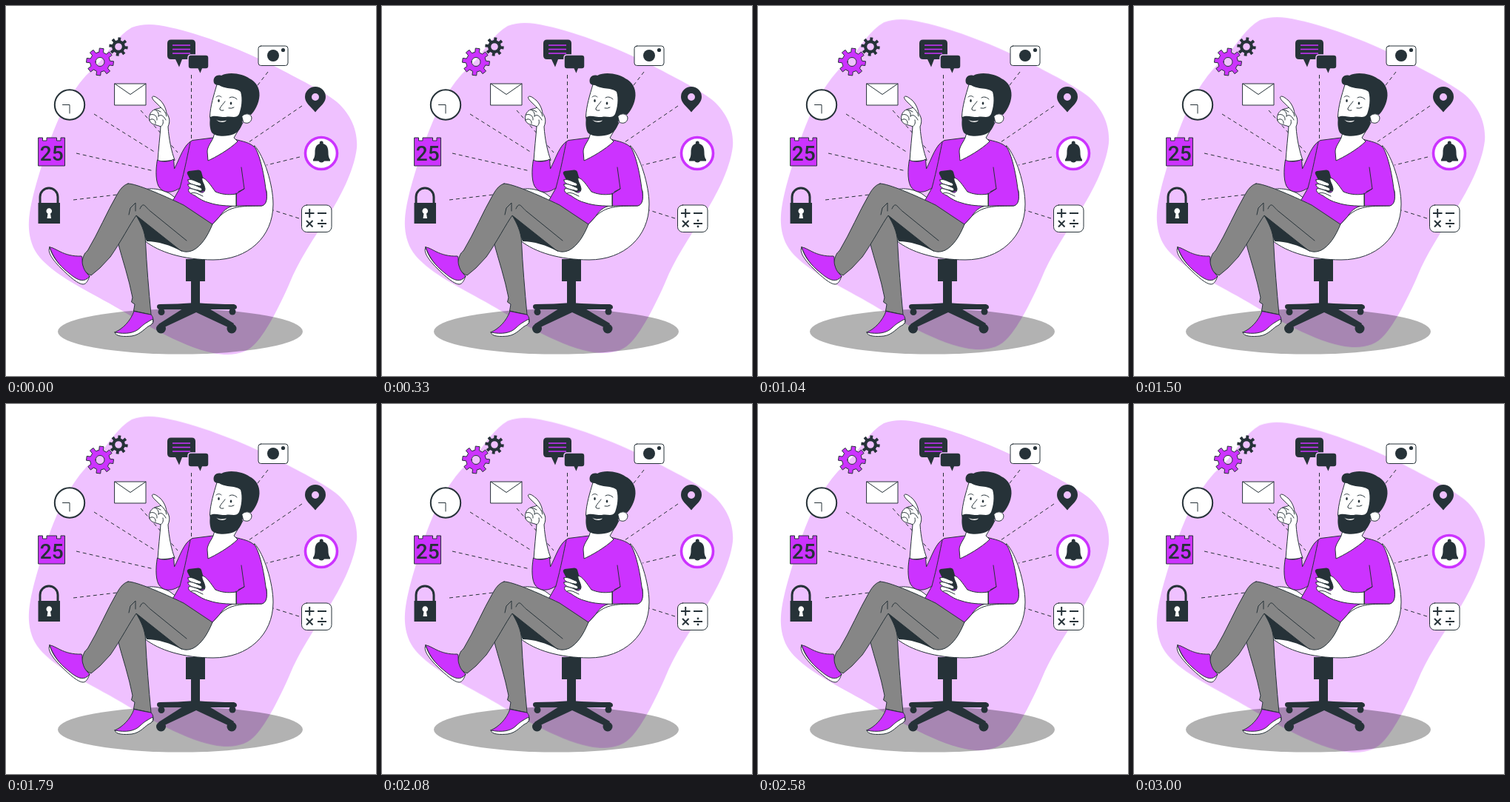
Write an HTML page that moves like this. It is 500x500 px and loops after 3.04 s.

```html
<!DOCTYPE html>
<html lang="en">
<head>
<meta charset="utf-8">
<title>Phone apps</title>
<style>
html, body { margin: 0; width: 100%; height: 100%; overflow: hidden; background: #fff; }
svg { display: block; width: 100vw; height: 100vh; }
.ink { fill: #263238; }
.pop { fill: #cc33ff; }
.paper { fill: #fff; }
.cloth { fill: #868686; }
.edge { stroke: #263238; stroke-width: 1; stroke-linejoin: round; stroke-linecap: round; }
.line { fill: none; stroke: #263238; stroke-width: 1; stroke-linejoin: round; stroke-linecap: round; }
.day { font: 500 28px Roboto, "Open Sans", sans-serif; font-stretch: 75%; text-anchor: middle; }
</style>
</head>
<body>
<svg viewBox="0 0 500 500">
  <path id="blob" fill="#efc1ff" d="M31 290C33 262 45 225 60 180C72 148 85 120 108 94C115 87 121 81 127 75C140 60 151 40 170 29C185 23.500 200 23.500 222 29C265 38 325 62 360 80C395 98 430 116 445 128C465 144 476 168 474 192C470 225 450 260 438 280C415 315 395 345 383 375C370 405 352 440 338 455C325 470 305 474 280 469C235 460 180 425 140 402C100 380 60 360 42 335C33 322 30 305 31 290Z"/>
  <ellipse cx="235.500" cy="440" rx="165.500" ry="30.500" opacity=".3"/>
  <path class="line" stroke-dasharray="5 4" style="stroke-linecap:butt" d="M119 146L202 198M95 199L200 223M91 262L150 255M182 141L232 198M250.500 93V180M354 89L320 133M400 135L328 184M397 204L352 215M396 287L358 275"/>

  <g id="gears"></g>

  <g id="chat">
    <path class="ink" d="M223 45.500H251Q256 45.500 256 50.500V67Q256 72 251 72H238L234 82.500L229 72H223Q218 72 218 67V50.500Q218 45.500 223 45.500Z"/>
    <path d="M225 53H249M225 58.500H249M225 64H249" stroke="#cc33ff" stroke-width="1.300"/>
    <path class="ink" stroke="#efc1ff" stroke-width="1.500" d="M250 66H270Q274 66 274 70V81Q274 85 270 85H265.500L262.500 92.500L259 85H250Q246 85 246 81V70Q246 66 250 66Z"/>
  </g>

  <g id="camera">
    <rect class="paper edge" x="341" y="54" width="40" height="26.500" rx="3.500"/>
    <circle class="ink" cx="361" cy="67" r="8"/>
    <circle class="ink" cx="374.500" cy="59.500" r="2.600"/>
  </g>

  <path class="ink" fill-rule="evenodd" d="M418 143.500C412 136 404 131 404 123A14 14 0 0 1 432 123C432 131 424 136 418 143.500ZM413 123A5 5 0 0 0 423 123A5 5 0 0 0 413 123Z"/>

  <g id="bell">
    <circle class="paper" cx="426" cy="199" r="21.500" stroke="#cc33ff" stroke-width="3.600"/>
    <path class="ink" d="M424 186A2.500 2.500 0 1 1 428.500 186C434 187.500 435.500 192 435.500 198C435.500 204 437 206 438 207.500V209.500H430A4 3.200 0 0 1 422.500 209.500H415V207.500C416 206 417.500 204 417.500 198C417.500 192 419 187.500 424 186Z"/>
  </g>

  <g id="calculator">
    <rect class="paper edge" x="399.500" y="269" width="40.500" height="36.500" rx="7"/>
    <path class="line" style="stroke-width:2;stroke-linecap:butt" d="M404 280H416.500M410.200 274V286M421 280H433M406 290L414.500 298.500M414.500 290L406 298.500M421 294H433"/>
    <circle class="ink" cx="427" cy="290" r="1.400"/>
    <circle class="ink" cx="427" cy="298" r="1.400"/>
  </g>

  <circle class="paper" cx="86" cy="133.500" r="20.200" stroke="#263238" stroke-width="2"/>
  <path class="line" d="M76.500 133.500H86V145"/>

  <path class="paper edge" d="M147 105H189V134H147Z"/>
  <path class="line" d="M147 105L168 119.500L189 105"/>

  <path class="pop edge" d="M44 178H49.500V182H55V178H68.500V182H74V178H79.500V216H44Z"/>
  <text class="ink day" x="61.700" y="209">25</text>

  <path class="line" style="stroke-width:3;stroke-linecap:butt" d="M46 267V258A12 12 0 0 1 70 258V267"/>
  <path class="ink" d="M43.500 266H73V294H43.500Z"/>
  <path class="paper" d="M56.500 280.500A3.800 3.800 0 1 1 60 280.500L61 287H55.500Z"/>

  <g id="base">
    <path class="ink" d="M243 342H269V372H262V404H250V372H243Z"/>
    <path class="ink" d="M208 403Q232 403 256 401Q284 403 308 403Q312 404 312 407Q312 410 308 410H208Q204 410 204 406Q204 403 208 403Z"/>
    <circle class="ink" cx="210" cy="413.500" r="4.500"/>
    <circle class="ink" cx="306" cy="413" r="4.500"/>
    <path class="ink" d="M250 402H263L308 429L304 436L257 414L210 436L206 430Z"/>
    <circle class="ink" cx="209.500" cy="436" r="6.500"/>
    <circle class="ink" cx="305" cy="436" r="6.500"/>
  </g>

  <g id="seat">
    <path class="paper edge" d="M336 189C349 203 361 242 361 268C361 312 327 343 280 343C240 343 207 333 187 317L178 252C190 244 208 246 222 254L240 268L320 260Z"/>
    <path class="line" d="M352 250C353 262 351 269 345 270C325 271 305 268 289 284L278 296"/>
  </g>

  <g id="farleg">
    <path class="ink" d="M175 282L190 318C205 318 222 323 238 332L240 320Z"/>
    <path class="cloth edge" d="M176 283C182 293 188 305 188.500 318C190 350 193 385 196 417L172.500 412L174 403L169.500 400L171 394C166 368 158 345 151 319Z"/>
    <path class="pop edge" d="M173 412.500C181 414 189 416 196 417C199 420 199.500 425 198.500 429C189 432 182 443 168 445C158 446 151 444 147 441C158 436 168 426 173 412.500Z"/>
    <path class="paper edge" d="M147 441C162 444 174 442 181 435C187 429 193 426 198.500 423Q200 428 196 431C188 434 183 444 170 446C160 447 148 447 147 441Z"/>
  </g>

  <g id="torso">
    <path class="paper edge" d="M205 210C206 193 208 177 209 163C203 160 195 161 193.500 153C193 146 197 141 201 140C204 138 207 139 209 137C206 133 197 127 197.500 123C200 120 205 125 208 127C213 132 216 138 217 145C221 150 222 156 219 163C220 180 224 198 228 208Z"/>
    <path class="line" d="M209 137C213 140 216 144 217 149M201 140C205 142 207 145 206 149M195 147C200 145 205 149 204 154M194 154C198 151 203 154 202 159M206 149C210 145 214 150 216 154M203 140L209 143M209 163C212 161 213 158 212 154"/>
    <path class="pop edge" d="M280 178L252 181.500C240 187 235 206 227.500 220L226.500 207C220 211 210 211 204.500 208C202 222 202 240 208 246C215 254 226 252 235 246L222 269L278 296L289 284C295 274 303 270 311 270H346C354 268 353 255 351 247C349 230 344 204 337 192C330 184 319 183 309 180Z"/>
    <path class="line" d="M249 184C246 198 242 220 235 246M318 218L322 247L311 254M322 247L314 251"/>
    <path class="paper edge" d="M283 168L280 178C277 185 272 190 272 197L273 209C282 205 302 194 313 183L308 178L320 158Z"/>
  </g>

  <g id="phone">
    <path class="ink" d="M247 223L260 221.500Q263 221.500 264 224L271 249L258 253L245 227Q244 224 247 223Z"/>
    <path class="paper edge" d="M311 254C299 256 290 254 283 251C277 243 271 233 265 232C264 237 268 240 269 247C269 252 265 254 260 250C255 248 250 246 247 247C245 251 250 254 255 256C262 261 267 264 275 266C287 270 299 270 311 270.500Z"/>
    <path class="paper edge" d="M246 235C251 233 256 237 262 239C265 241 264 244 260 243C254 242 245 240 246 235Z"/>
    <path class="paper edge" d="M246 241C250 239 257 243 264 246C266 249 264 251 260 249C254 248 245 246 246 241Z"/>
    <path class="line" d="M250 253C255 251 260 254 266 257"/>
    <path class="line" d="M311 253V270"/>
  </g>

  <g id="nearleg">
    <path class="cloth edge" d="M165 240C176 240 211 255 240 269L279 295C272 312 264 324 253 330C246 333 240 333 234 329L176 283C168 294 155 319 141 339L127 354L115 364C106 361 101 351 103 344C105 336 107 333 110 331C125 306 136 279 150 255Q157 242 165 240Z"/>
    <path class="line" d="M166 282L168 273L175 266V277M181 274C186 263 188 272 196 278L244 317"/>
    <path class="pop edge" d="M59 326C67 326 77 339 102 338C104 340 102 346 104 351C106 359 111 363 113 365L106 375C92 372 67 350 59 326Z"/>
    <path class="paper edge" d="M59 326C56 331 60 340 74 354C87 367 98 376 104 376C109 376 111 370 113 365C106 374 98 372 85 361C71 350 62 338 59 326Z"/>
  </g>

  <g id="head">
    <path class="paper edge" d="M285 106C281 120 276 135 275.500 150L281 172L314 168L325 140L316 106Z"/>
    <path class="ink" d="M281 104C279 97 284 92 291 94C302 88 321 92 329 98C338 102 343 111 342.500 121C342 132 336 142 331 147C325 145 321 147 319 149C321 159 317 169 308 173C298 177 284 177 278 171C275 165 275 157 276 150C282 147 288 150 297 150C304 148 311 153 315 146C318 138 320 126 317 116C312 110 296 113 288 107C284 107 282 106 281 104Z"/>
    <path class="paper edge" d="M319 149C323 144 331 145 332 151C332 158 325 160 321 157Z"/>
    <path class="paper" d="M284 153.500C288 156 293 156 298 154.500C296 158 288 158 284 153.500Z"/>
    <path class="line" d="M284 123C286 121 289 121 291 123M302 124C305 122 309 123 312 126M296 129C293 133 288 138 289 140Q291 142 294 141"/>
    <ellipse class="ink" cx="287.500" cy="128" rx="1.300" ry="2"/>
    <ellipse class="ink" cx="304" cy="131.500" rx="1.300" ry="2"/>
    <path class="line" d="M301 138Q305 139 308 137"/>
  </g>
</svg>
<script>
const NS = "http://www.w3.org/2000/svg";

function gear(cx, cy, outer, inner, hole, teeth, kind) {
  const step = 2 * Math.PI / teeth;
  const at = (r, a) => `${(cx + r * Math.cos(a)).toFixed(2)} ${(cy + r * Math.sin(a)).toFixed(2)}`;
  const corners = [];
  for (let i = 0; i < teeth; i++) {
    const a = i * step - Math.PI / 2 + 0.12;
    corners.push(at(inner, a - step * 0.27), at(outer, a - step * 0.2),
                 at(outer, a + step * 0.2), at(inner, a + step * 0.27));
  }
  const path = document.createElementNS(NS, "path");
  path.setAttribute("d", `M${corners.join("L")}ZM${cx - hole} ${cy}a${hole} ${hole} 0 1 0 ${2 * hole} 0a${hole} ${hole} 0 1 0 ${-2 * hole} 0Z`);
  path.setAttribute("fill-rule", "evenodd");
  path.setAttribute("class", kind);
  document.getElementById("gears").append(path);
}
gear(127, 75.5, 18.5, 13.5, 6, 8, "pop edge");
gear(152, 55, 12.8, 9, 4.8, 8, "ink");

// Steady float: 10 px up and back.
document.getElementById("blob").animate(
  [0, -10, 0].map(y => ({ transform: `translateY(${y}px)` })),
  { duration: 3040, iterations: Infinity, easing: "linear" }
);
</script>
</body>
</html>
```
